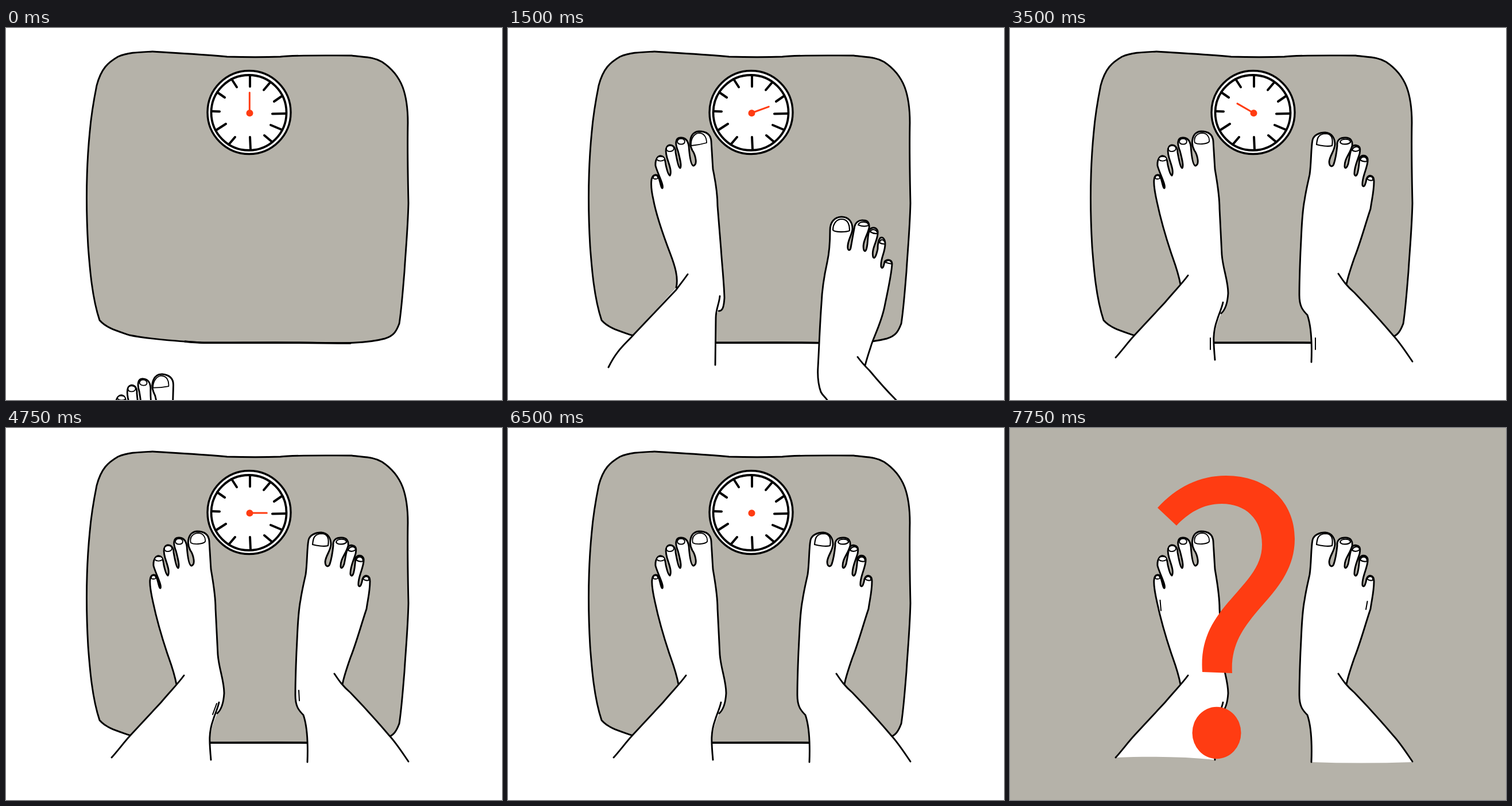
Animation, 864 px wide and 648 px high, one loop 8000 ms. Source, as an HTML page:

```html
<!DOCTYPE html>
<html lang="en">
<head>
<meta charset="utf-8">
<title>Bathroom scale</title>
<style>
  html, body { margin: 0; width: 100%; height: 100%; overflow: hidden; background: #fff; }
  svg { display: block; width: 100vw; height: 100vh; }
  .ink { fill: none; stroke: #000; stroke-width: 2.9; stroke-linecap: round; stroke-linejoin: round; }
  .nail { fill: #fff; stroke: #000; stroke-width: 1.8; stroke-linejoin: round; }
  .skin { fill: #fff; }
  .grey { fill: #b5b2a9; }
  .red { fill: #ff3c12; }
</style>
</head>
<body>
<svg viewBox="0 0 864 648">
  <rect id="wash" class="grey" width="864" height="648"/>

  <g id="scale">
    <path class="ink" style="fill:#b5b2a9" d="M163 509C150 470 146 420 143 380C139 310 140 240 146 180C149 145 154 120 158 100C166 70 178 60 195 50C213 42 235 42 255 41C300 44 345 46 385 50C420 51 450 51 478 50C500 47 560 48 602 48C625 51 640 50 655 59C676 73 686 90 691 103C698 122 700 142 700 165C699 210 700 260 701 305C700 350 696 390 694 425C691 460 689 490 685 515C680 528 676 536 660 541C620 552 560 548 510 548C440 547 390 549 340 548C290 545 245 541 215 535C195 528 175 523 163 509Z"/>
    <path class="ink" style="stroke-width:3.6" d="M312 546Q330 548 345 548.3H510Q560 549 600 549"/>
    <circle class="ink" style="fill:#fff;stroke-width:3.4" cx="423.5" cy="147" r="72.5"/>
    <circle class="ink" style="stroke-width:3.8" cx="423" cy="147.5" r="65.5"/>
    <path class="ink" style="stroke-width:4" d="M425 83V102M460 95L449 108M480 119L467 128M488 149L464 149.5M480 177L461 169M463 198L450 187M426 212L425 190M388 203L399 190M366 178L383 167M358 145L372 145.5M368 112L381 121M393 89L402 103"/>
    <path id="needle" fill="none" stroke="#ff3c12" stroke-width="3" stroke-linecap="round"/>
    <circle class="red" cx="424.5" cy="148.3" r="6"/>
  </g>

  <g id="left">
    <path class="skin"/>
    <path class="ink"/>
    <path class="nail"/>
  </g>

  <g id="right">
    <path class="skin"/>
    <path class="ink"/>
    <path class="nail" style="stroke-width:2.2"/>
  </g>

  <path id="marks" class="ink" style="stroke-width:2"/>

  <g id="question" class="red">
    <path d="M257 139C290 103 330 83 376 83C448 83 496 128 496 193C496 250 460 285 430 320C405 350 384 380 387 427L335 425C331 370 352 335 385 298C415 263 439 240 439 203C439 158 410 132 369 132C335 132 310 149 290 170Z"/>
    <ellipse cx="360" cy="531" rx="42.5" ry="45.2"/>
  </g>
</svg>

<script>
const STEP = 250, COUNT = 32, LAST = COUNT - 1;
const el = id => document.getElementById(id);
const show = (id, on) => { el(id).style.display = on ? "" : "none"; };

// Each pose: foot outline, closing of the filled area, leg lines, nails.
const leftToes = "C252 254 261 253 263 262C265 268 267 280 269 279C272 274 260 252 257 240C256 226 263 222 267 223C273 224 274 232 275 239C277 248 279 256 282 257C286 250 280 236 277 226C274 215 274 206 281 204C288 203 292 209 292 217C294 228 297 244 300 244C303 240 299 226 296 214C291 202 291 191 301 191C311 191 314 199 315 206C316 220 318 239 323 240C331 238 326 220 321 213C314 200 317 181 333 180C347 180 353 186 354 197C355 215 356 230 357 246";
const leftNails = "M295 198C296 191 307 191 308 198C307 204 296 204 295 198ZM276 211C275 203 289 203 289 210C288 216 277 217 276 211ZM259 229C259 222 273 222 273 229C269 232 263 233 259 229ZM253 262C253 255 261 255 261 262Q257 264 253 262Z";
const poses = {
  leftLanding: {
    foot: "M293 452C297 435 291 415 283 394C270 360 258 325 253 298C250 285 249 272 250 264" + leftToes + "C361 265 365 285 365 310L371 385C373 415 376 440 377 470C376 486 374 493 367 493",
    close: "L362 500L361 587L175 591C190 560 205 550 219 534L293 452Z",
    leg: "M313 429C303 443 298 449 293 456L219 534C205 550 190 560 175 591M369 467C368 480 362 490 362 505L361 587",
    nails: "M319 205C318 192 325 183 333 183C341 183 346 190 346 200Q332 204 319 205Z" + leftNails
  },
  leftStanding: {
    foot: "M297 447C293 425 287 410 281 393C270 360 260 322 256 303C252 285 250 272 251 264" + leftToes + "C361 270 365 290 365 315L369 395C371 420 380 440 380 462C379 478 376 490 368 497",
    close: "C353 530 354 550 357 578C300 572 240 572 184 574L217 535L297 447Z",
    leg: "M310 431C300 445 285 460 270 478L217 535C205 548 195 562 184 574M371 478C369 488 364 498 361 508C353 530 354 545 357 578",
    nails: "M322 200C319 189 327 183 335 183C343 183 348 190 347 198C342 203 327 203 322 200Z" + leftNails
  },
  rightStepping: {
    foot: "M556 648C552 642 548 640 545 634C540 620 539 605 540 590C542 555 543 520 546 480C547 455 550 435 556 408C560 390 561 375 561 352C561 338 569 329 581 329C593 329 600 337 600 350C599 362 590 372 592 384C593 388 596 388 597 383C599 372 601 360 603 350C604 338 612 334 619 335C627 335 630 340 629 348C626 362 616 374 620 387C623 392 625 384 626 376C627 366 627 358 630 351C634 346 642 347 644 354C646 368 632 384 636 399C639 404 642 394 644 385C644 376 645 370 648 366C653 363 657 368 657 376C657 392 648 402 650 416C653 422 655 412 656 407C660 402 669 403 669 411C668 430 662 455 656 485C650 515 636 540 632 555C627 570 624 580 622 588",
    close: "L676 648Z",
    leg: "M609 573C614 580 620 587 630 597C645 615 660 632 676 648",
    nails: "M566 352C566 340 573 333 581 333C590 333 595 340 595 353C588 356 570 356 566 352ZM610 343C612 336 628 336 628 344Q619 347 610 343ZM631 355C633 349 642 350 644 358Q637 359 631 355ZM647 374C649 366 656 368 657 376Q652 377 647 374ZM657 408C661 403 667 404 669 411Q662 410 657 408Z"
  },
  rightStanding: {
    foot: "M525 582C526 555 525 520 518 500C510 492 504 485 504 465C504 440 505 415 506 390C508 355 508 325 513 300C516 280 520 265 522 255C525 235 524 210 527 195C529 186 540 182 549 182C561 183 566 192 566 203C565 215 557 222 556 233C556 242 562 243 564 237C568 225 569 215 570 205C569 194 576 191 584 191C594 191 597 197 596 205C592 220 582 228 583 242C584 246 587 243 589 237C591 228 592 219 594 213C595 205 600 203 605 205C611 207 610 213 609 219C605 232 599 243 600 255C602 260 605 256 606 250C608 242 608 234 609 227C612 220 621 221 623 228C625 240 612 260 614 274C617 280 620 270 621 263C624 254 634 256 634 267C634 285 630 300 628 315C618 345 610 375 600 400C593 420 588 435 586 447",
    close: "L667 535L701 582Q610 585 525 582Z",
    leg: "M572 428C580 440 586 449 600 461C630 492 650 515 667 535C680 549 690 565 701 581",
    nails: "M534 203C535 193 536 185 549 184C561 184 563 193 561 205C554 207 541 205 534 203ZM575 199C576 192 593 192 593 199C590 203 578 204 575 199ZM596 213C598 205 609 205 609 212Q603 217 596 213ZM610 230C612 222 622 223 622 232Q616 234 610 230ZM622 263C625 256 633 258 632 265Q627 267 622 263Z"
  }
};

// Small shake lines climbing along both feet, one letter per step.
const markShapes = {
  a: "M349 540V560M532 540V560",
  b: "M367 480L360 499M510 457L511 475",
  c: "M296 399Q297 409 300 418",
  d: "M270 341L273 351M272 349L277 364M609 343L604 363",
  e: "M261.5 300L263 318M622.5 302L620 316"
};
const markOrder = "----------cde-acd-abcde-ab-abcde";

// Left edge, top and size of the question mark.
const questions = { 25: [213, 7, .72], 28: [121, 30, .72], 30: [142, 56, .718], 31: [257, 83, 1] };

function placeNeedle(n) {
  const degrees = n < 4 ? 0 : n < 7 ? 10 + 30 * (n - 4) : 30 * (n - 4);
  const a = degrees * Math.PI / 180, length = 30 + 5.5 * Math.cos(a);
  const x = 424.3 + length * Math.sin(a), y = 148 - length * Math.cos(a);
  el("needle").setAttribute("d", `M424.3 148L${x} ${y}`);
  show("needle", n < 26);
}

function setFoot(id, pose, transform) {
  const [skin, ink, nail] = el(id).children;
  skin.setAttribute("d", pose.foot + pose.close);
  ink.setAttribute("d", pose.foot + pose.leg);
  nail.setAttribute("d", pose.nails);
  el(id).setAttribute("transform", transform);
}

function placeFeet(n) {
  const landed = n > 6, l = Math.max(0, 3 - n), r = Math.max(0, 6 - n);
  setFoot("left", landed ? poses.leftStanding : poses.leftLanding,
    `translate(${-20.3 * l} ${141 * l}) rotate(${1.7 * l} 333 180)`);
  setFoot("right", landed ? poses.rightStanding : poses.rightStepping,
    `translate(${40 * r} ${146.5 * r})`);
}

function draw(n) {
  show("wash", n === LAST);
  show("scale", n !== LAST);
  placeNeedle(n);
  placeFeet(n);
  el("marks").setAttribute("d", markShapes[markOrder[n]] || "");
  const q = questions[n];
  show("question", q);
  if (q) el("question").setAttribute("transform", `translate(${q[0]} ${q[1]}) scale(${q[2]}) translate(-257 -83)`);
}

let start, drawn;
function tick(now) {
  start ??= now;
  const n = Math.floor((now - start) / STEP) % COUNT;
  if (n !== drawn) draw(drawn = n);
  requestAnimationFrame(tick);
}
draw(0);
requestAnimationFrame(tick);
</script>
</body>
</html>
```
